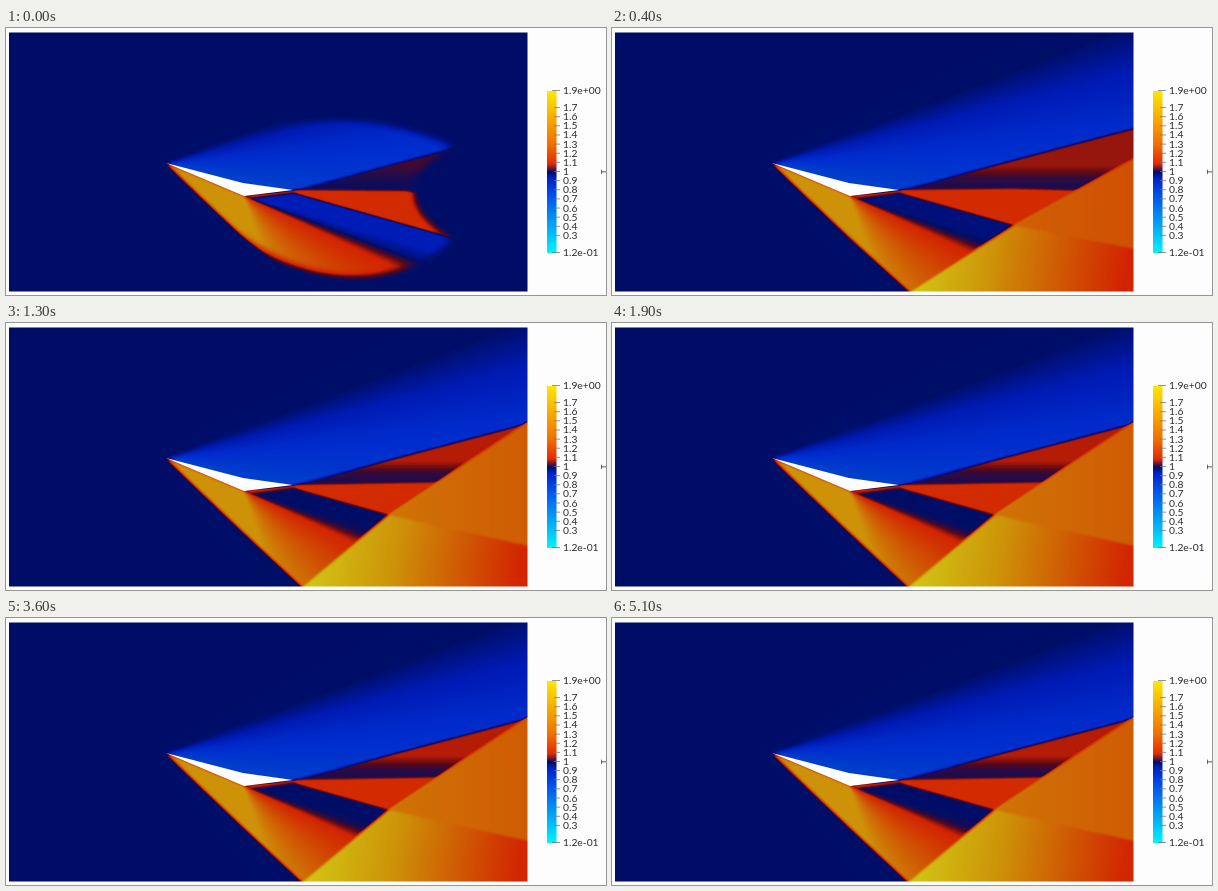
These frames come from a looping animation (600 px wide and 267 px high, 5.2 s). An HTML page with a canvas:

```html
<!DOCTYPE html>
<html lang="en">
<head>
<meta charset="utf-8">
<title>Temperature field around a wedge airfoil</title>
<style>
  html, body { margin: 0; width: 100%; height: 100%; overflow: hidden; background: #fdfdfd; }
  canvas, svg { position: absolute; left: 0; top: 0; width: 100%; height: 100%; display: block; }
  text { font: 10.3px Lato, "Open Sans", sans-serif; fill: #2a2a2a; }
</style>
</head>
<body>
<canvas id="view" width="600" height="267"></canvas>
<svg viewBox="0 0 600 267">
  <defs>
    <linearGradient id="bar" x1="0" y1="0" x2="0" y2="1">
      <stop offset="0" stop-color="#fde800"/>
      <stop offset=".33" stop-color="#f07000"/>
      <stop offset=".45" stop-color="#e62800"/>
      <stop offset=".5" stop-color="#000d66"/>
      <stop offset=".54" stop-color="#0022c8"/>
      <stop offset=".65" stop-color="#0054ee"/>
      <stop offset="1" stop-color="#00f4ff"/>
    </linearGradient>
  </defs>
  <rect x="541" y="63" width="9.5" height="162" fill="url(#bar)"/>
  <g id="scale"></g>
  <text transform="translate(600.5 144) rotate(-90)" text-anchor="middle" style="font-size:8px">T</text>
</svg>
<script>
const W = 600, H = 267, LOOP = 5200, STEP = 100, FAR = 545;
const tip = [160, 135], corner = [238, 168], tail = [287, 162];
const view = document.getElementById('view').getContext('2d');
const field = document.createElement('canvas');
field.width = W;
field.height = H;
const g = field.getContext('2d', { willReadFrequently: true });

const lerp = (a, b, u) => a + (b - a) * u;

// The field is painted as grey (temperature 0.6 to 1.8), then coloured by this map.
const T_MIN = 0.6, T_SPAN = 1.2;
const colours = [
  [0.6, [0, 100, 200]], [0.85, [0, 45, 205]], [0.93, [0, 26, 180]], [1, [0, 13, 102]],
  [1.06, [92, 8, 24]], [1.13, [210, 34, 0]], [1.5, [205, 146, 8]], [1.8, [210, 206, 22]]
];
const lut = Array.from({ length: 256 }, (_, i) => {
  const T = T_MIN + T_SPAN * i / 255;
  const k = Math.max(1, colours.findIndex(c => c[0] >= T - 1e-9));
  const [t0, a] = colours[k - 1], [t1, b] = colours[k];
  return a.map((v, c) => lerp(v, b[c], (T - t0) / (t1 - t0)));
});

function grey(T) {
  const v = Math.round((T - T_MIN) / T_SPAN * 255);
  return `rgb(${v},${v},${v})`;
}

function trace(c, points) {
  c.beginPath();
  points.forEach(p => c.lineTo(...p));
  c.closePath();
}

function paint(points, fill, blur) {
  g.filter = `blur(${blur}px)`;
  g.fillStyle = fill;
  trace(g, points);
  g.fill();
  g.filter = 'none';
}

function ramp(from, to, stops) {
  const r = g.createLinearGradient(...from, ...to);
  stops.forEach(([at, T]) => r.addColorStop(at, grey(T)));
  return r;
}

// Rays from a corner; angles in degrees, clockwise from the right.
function fan(origin, stops) {
  const r = g.createConicGradient(-Math.PI / 6, ...origin);
  stops.forEach(([angle, T]) => r.addColorStop((angle + 30) / 360, grey(T)));
  return r;
}

// Still air outside the starting wave, which grows away from the tip.
function paintStillAir(size) {
  const at = (x, y) => [tip[0] + (x - tip[0]) * size, tip[1] + (y - tip[1]) * size];
  g.filter = 'blur(3px)';
  g.fillStyle = grey(1);
  g.beginPath();
  g.rect(-50, -50, W + 100, H + 100);
  g.moveTo(...tip);
  g.quadraticCurveTo(...at(310, 60), ...at(445, 119));
  g.quadraticCurveTo(...at(370, 165), ...at(445, 212));
  g.bezierCurveTo(...at(395, 262), ...at(270, 275), ...tip);
  g.fill('evenodd');
  g.filter = 'none';
}

function draw(t) {
  const settle = t > 200 ? 1 - Math.exp((200 - t) / 150) : 0;
  const to = (a, b) => lerp(a, b, settle);
  const sink = 60 * Math.max(0, 1 - t / 200);

  g.fillStyle = grey(1);
  g.fillRect(0, 0, W, H);

  // Expansion above the body
  paint([tip, [FAR, -20], [FAR, 110], [288, 170], [238, 164]],
    fan(tip, [[-21, 1], [-15, 0.937], [-7, 0.87], [12, 0.77]]), 1);

  // Wake between the tail shock and the slip line
  paint([tail, [FAR, 94], [FAR, 265], [300, 175]],
    ramp([0, 158], [0, 138], [[0, to(1.01, 1.02)], [0.4, to(1.02, 1.035)], [1, to(1.04, 1.115)]]), 0.9);

  // Compressed gas below, turning round the lower corner
  const wedgeEnd = [458, 213];
  paint([tip, [237, 208], [to(304, 297), 264], [310, 285], [460, 285], wedgeEnd, [288, 164], corner],
    fan(corner, [[16, to(0.92, 1)], [20, to(0.98, 1.02)], [25, 1.13], [42, 1.27], [72, 1.5]]), 1.1);

  // Hot layer under the slip line
  paint([corner, tail, [400, to(163, 160)], [470, to(173, 159)], [FAR, to(148, 158)],
    [FAR, 240], wedgeEnd, [288, 165], [245, 170]], grey(1.16), 0.8);

  // Shock reflected from the floor
  const foot = [to(304, 297), 264 + sink];
  const bend = [to(455, 383), to(213, 192) + sink];
  const end = [FAR, to(214, 84) + sink];
  paint([foot, bend, end, [FAR, 330], [285, 330]],
    ramp([310, 240], [510, 270], [[0, 1.74], [0.4, to(1.38, 1.49)], [1, to(1.1, 1.14)]]), 1.2);
  paint([bend, end, [FAR, to(218, 228) + sink]],
    ramp([383, 0], [521, 0], [[0, to(1.19, 1.4)], [1, to(1.18, 1.32)]]), 0.9);

  paintStillAir(1 + t / 77);
  show();
}

function show() {
  const img = g.getImageData(0, 0, W, H);
  for (let i = 0; i < img.data.length; i += 4) img.data.set(lut[img.data[i]], i);
  g.putImageData(img, 0, 0);

  view.clearRect(0, 0, W, H);
  view.save();
  view.beginPath();
  view.rect(3, 4.5, 518.5, 259);
  view.clip();
  view.drawImage(field, 0, 0);
  view.restore();
  view.fillStyle = '#fff';
  trace(view, [tip, [237, 155], tail, corner]);
  view.fill();
}

function addMark(label, y, left) {
  document.getElementById('scale').innerHTML +=
    `<path d="M${left} ${y}H554" stroke="#777" stroke-width=".8"/>` +
    `<text x="557" y="${y + 3.5}">${label}</text>`;
}

addMark('1.9e+00', 62.5, 546);
for (let k = 17; k >= 3; k--) addMark(k / 10, 143.5 - (k - 10) * 9.13, 548);
addMark('1.2e-01', 224.5, 546);

let shown = -1;
function tick() {
  const t = Math.floor(performance.now() % LOOP / STEP) * STEP;
  if (t !== shown) draw(shown = t);
  requestAnimationFrame(tick);
}
tick();
</script>
</body>
</html>
```
